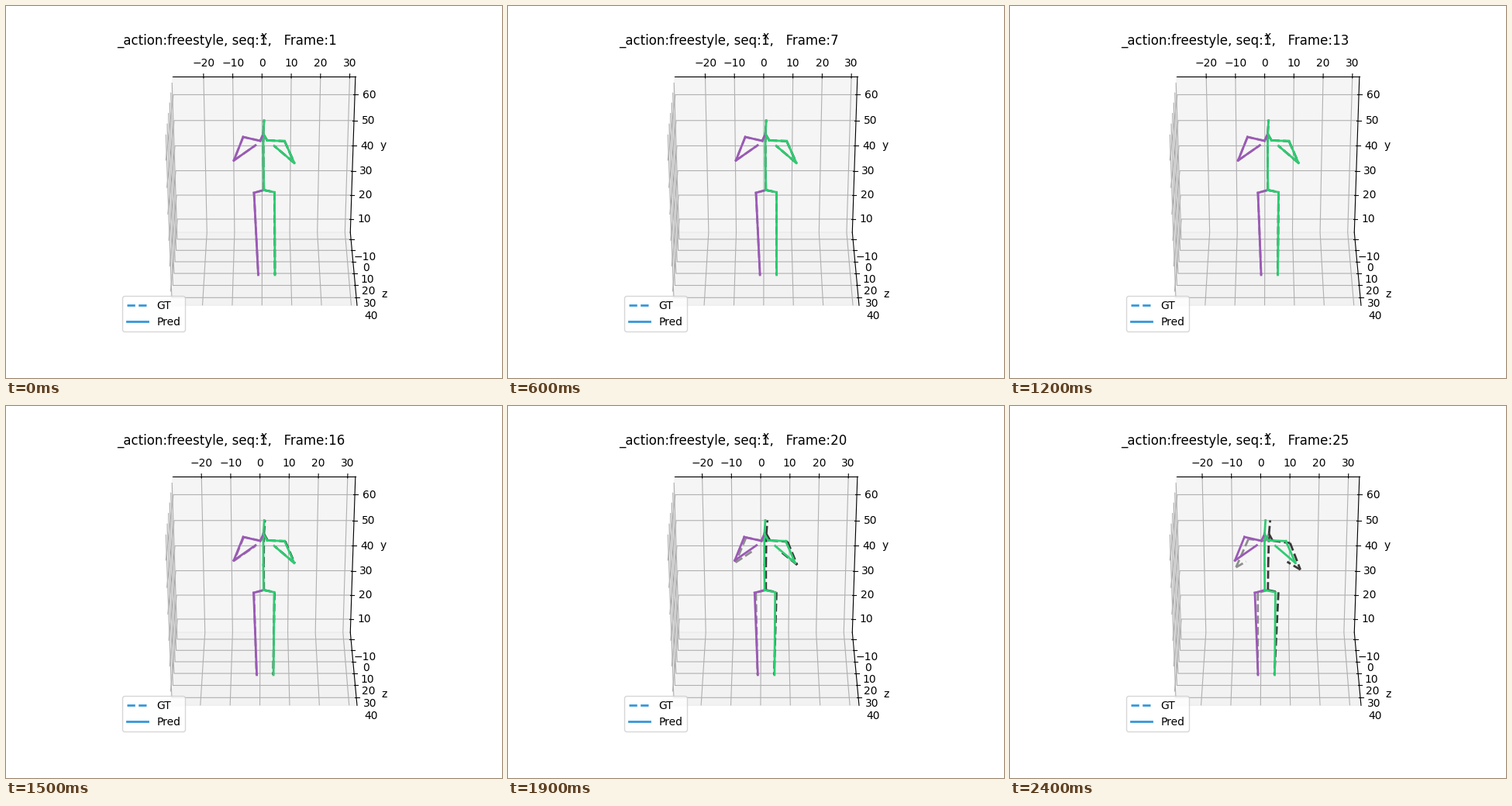
These frames come from a looping animation (640x480 px, 2.5 s). A matplotlib script:

```python
import numpy as np
import matplotlib.pyplot as plt
from matplotlib.animation import FuncAnimation
from matplotlib.lines import Line2D
from matplotlib.transforms import Affine2D

FRAMES, INTERVAL = 25, 100
HALF = 31.25  # half the span of every axis
CENTER_Y, CENTER_Z = 35.65, 14.95
SPLIT = 12    # the prediction departs from the ground truth here
LAG = 4       # how far it finally falls behind, in pixels

# Key points in screen pixels
PELVIS, NECK = (332.8, 237.5), (332, 165)
STILL = (0, 0)

# Side (0 left, 1 right), final swing of the tip, joints from root to tip
LIMBS = [
    (0, STILL, [PELVIS, (320, 241), (325.5, 347)]),
    (1, STILL, [PELVIS, (346.5, 240.3), (347, 347)]),
    (1, STILL, [PELVIS, (332.2, 205), NECK, (333, 147.5)]),
    (0, (-18.5, 21), [NECK, (328, 174), (306, 169), (294, 199.3), (322, 179.7)]),
    (1, (10.5, 20.5), [NECK, (337, 173.5), (359.5, 174.3), (372, 202.5), (346, 180.5)]),
]


def ease(i, start=0, power=2):
    return (max(i - start, 0) / (FRAMES - 1 - start)) ** power


def pose(joints, tip, lean, swing, lag):
    """Lean the body about the pelvis, swing the limb and shift it left."""
    joints = np.array(joints, float)
    reach = np.linspace(0, 1, len(joints))[:, None]
    joints += swing * np.array(tip) * reach ** (6, 3)
    height = PELVIS[1] - joints[:, 1]
    joints[:, 0] += lean * height * np.where(height > 0, 0.03, 0.053) - lag
    return joints


def truth(i):
    return ease(i), ease(i, SPLIT, 2.3), 0


def prediction(i):
    return ease(min(i, SPLIT)), 0, LAG * ease(i, SPLIT, 1.6)


fig = plt.figure(figsize=(6.4, 4.8), dpi=100)
ax = fig.add_subplot(projection='3d')
# The tiny turn keeps the edge-on side pane on the left
ax.view_init(elev=120, azim=-90.00001)
ax.set(xlabel='x', ylabel='y', zlabel='z')
ax.set_xticks(range(-20, 31, 10))
ax.set_yticks(range(10, 61, 10))
ax.set_zticks(range(-10, 41, 10))
ax.set_ylim(CENTER_Y - HALF, CENTER_Y + HALF)
ax.set_zlim(CENTER_Z - HALF, CENTER_Z + HALF)

keys = [Line2D([], [], color='#3498db', lw=2, ls=ls) for ls in ('--', '-')]
ax.legend(keys, ['GT', 'Pred'], loc='lower left')

screen = Affine2D().scale(1, -1).translate(0, 480)


def skeleton(colors, ls, zorder):
    """Add one line per bone, grouped by limb."""
    return [[fig.add_artist(Line2D([], [], color=colors[side], lw=2, ls=ls,
                                   zorder=zorder, transform=screen))
             for _ in joints[1:]]
            for side, _, joints in LIMBS]


bodies = [(truth, skeleton(('#8e8e8e', '#383838'), '--', 3)),
          (prediction, skeleton(('#9b59b6', '#2ecc71'), '-', 4))]


def update(i):
    center = 0.7 + 1.82 * ease(i)
    ax.set_xlim(center - HALF, center + HALF)
    ax.set_title(f'_action:freestyle, seq:1,   Frame:{i + 1}', loc='left', y=1)
    for motion, limbs in bodies:
        for bones, (_, tip, joints) in zip(limbs, LIMBS):
            points = pose(joints, tip, *motion(i))
            for bone, a, b in zip(bones, points, points[1:]):
                bone.set_data([a[0], b[0]], [a[1], b[1]])
    return []


anim = FuncAnimation(fig, update, frames=FRAMES, interval=INTERVAL,
                     init_func=lambda: update(0), repeat=True, repeat_delay=0)
plt.show()
```
